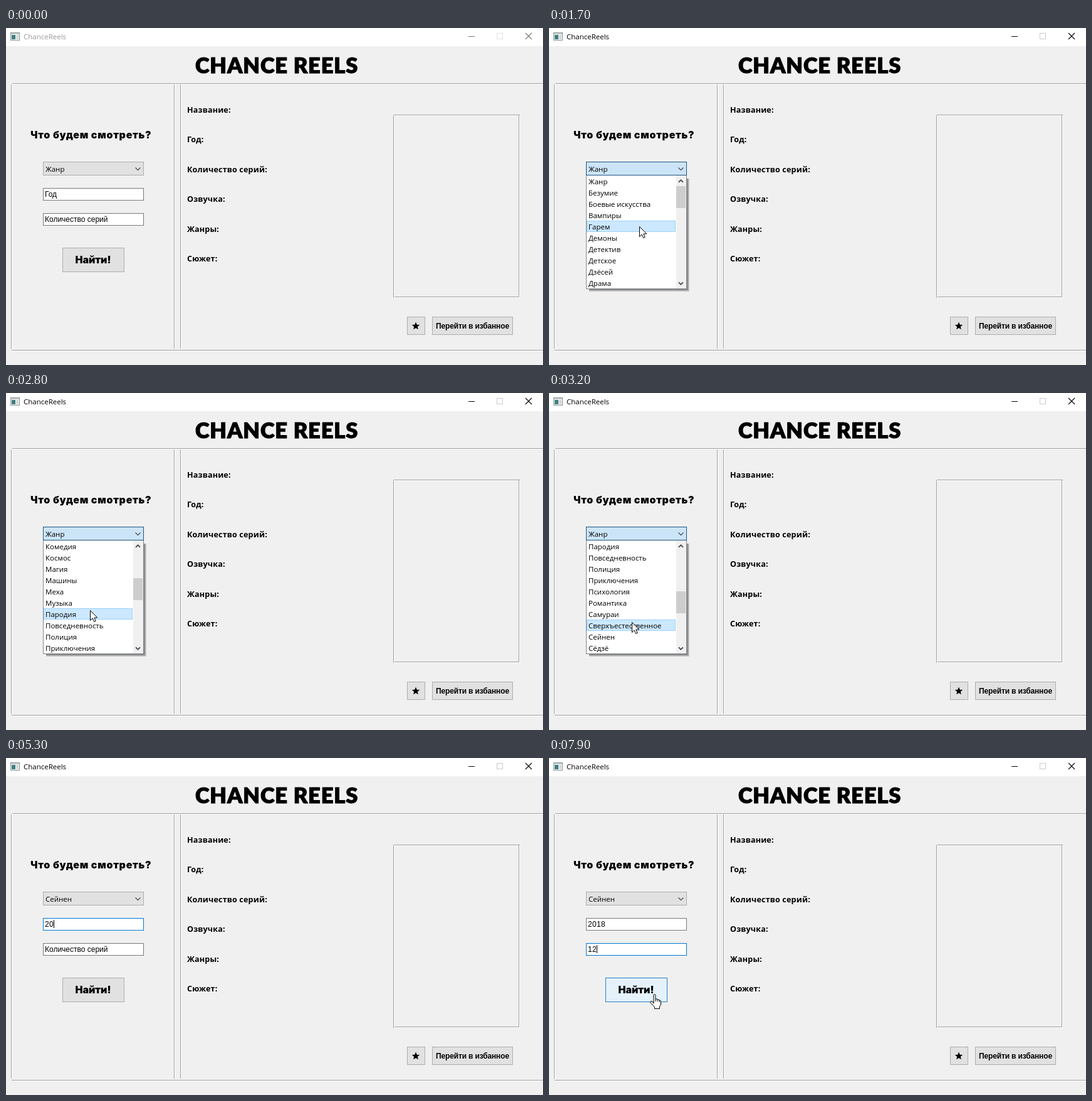
Write an HTML page with a canvas that moves like this. It is 857 by 537 pixels and loops after 8000 ms.

```html
<!DOCTYPE html>
<html lang="ru">
<head>
<meta charset="utf-8">
<title>ChanceReels</title>
<style>
html, body { margin: 0; width: 100%; height: 100%; overflow: hidden; background: #f0f0f0; }
canvas { display: block; }
</style>
</head>
<body>
<canvas id="stage" width="857" height="537"></canvas>
<script>
const ctx = document.getElementById('stage').getContext('2d');
const LOOP = 8000, STEP = 100;

const UI = '11.5px "Open Sans", "Noto Sans", sans-serif';
const LABEL = '700 12.6px "Open Sans", "Noto Sans", sans-serif';
const BLACK = '900 16px Inter, "Liberation Sans", sans-serif';
const FIELD = '12px "Liberation Sans", sans-serif';
const TITLE = '900 34.5px Lato, "Open Sans", sans-serif';

const GENRES = ('Жанр,Безумие,Боевые искусства,Вампиры,Гарем,Демоны,Детектив,Детское,Дзёсей,Драма,' +
  'Игры,Исторический,Комедия,Космос,Магия,Машины,Меха,Музыка,Пародия,Повседневность,' +
  'Полиция,Приключения,Психология,Романтика,Самураи,Сверхъестественное,Сейнен,Сёдзё').split(',');

// Looks of the controls: [fill, border]
const LOOK = {
  idle: ['#e1e1e1', '#adadad'],
  fading: ['#dbe1e8', '#7a9ab5'],
  warm: ['#e1e5e9', '#6f9cc0'],
  hover: ['#e5f1fb', '#2a7fc4'],
  open: ['#cce4f7', '#1f5482']
};

// Pointer path: [time, x, y, shape]; each shape lasts until the next key
const PATH = [
  [200, 165, 51, 'arrow'], [500, 178, 150, 'arrow'], [700, 178, 222, 'arrow'],
  [900, 171, 218, 'arrow'], [1300, 171, 218, 'arrow'], [1400, 168, 240, 'arrow'],
  [1700, 144, 316, 'arrow'], [1900, 135, 352, 'arrow'], [2100, 135, 360, 'arrow'],
  [2600, 135, 360, 'arrow'], [2800, 134, 346, 'arrow'], [3100, 134, 346, 'arrow'],
  [3300, 130, 384, 'arrow'], [3500, 125, 380, 'arrow'], [3700, 109, 301, 'beam'],
  [3800, 105, 257, 'none'], [6200, 120, 326, 'arrow'], [6300, 135, 365, 'hand'],
  [6400, 150, 407, 'arrow'], [6500, 170, 362, 'hand'], [6600, 184, 322, 'arrow'],
  [6700, 170, 300, 'none'], [7600, 186, 334, 'arrow'], [7800, 166, 367, 'hand'],
  [7900, 161, 376, 'hand']
];

// Value of the last entry whose time has passed
const at = (t, list) => list.reduce((v, [from, value]) => (t >= from ? value : v), list[0][1]);

function rect(x, y, w, h, fill) {
  ctx.fillStyle = fill;
  ctx.fillRect(x, y, w, h);
}

function box(x, y, w, h, [fill, border]) {
  rect(x, y, w, h, border);
  rect(x + 1, y + 1, w - 2, h - 2, fill);
}

function text(str, x, y, font, spacing = 0, color = '#000', align = 'left') {
  ctx.font = font;
  ctx.letterSpacing = spacing + 'px';
  ctx.textAlign = align;
  ctx.fillStyle = color;
  ctx.fillText(str, x, y);
}

function line(points, color, width = 1) {
  ctx.beginPath();
  points.forEach(([x, y]) => ctx.lineTo(x, y));
  ctx.strokeStyle = color;
  ctx.lineWidth = width;
  ctx.stroke();
}

function chevron(x, y, dir, color, width, size = 4) {
  line([[x - size, y - dir * size / 2], [x, y + dir * size / 2], [x + size, y - dir * size / 2]], color, width);
}

function etchH(x, y, w) {
  rect(x, y, w, 1, '#a0a0a0');
  rect(x, y + 1, w, 1, '#fff');
}

function etchV(x, y, h) {
  rect(x, y, 1, h, '#a0a0a0');
  rect(x + 1, y, 1, h, '#fff');
}

function titleBar(active) {
  rect(0, 0, 857, 29, '#fff');
  box(7, 7, 15, 13, ['#f4f6f6', '#8b9495']);
  rect(8, 8, 13, 2, '#c3cbcc');
  rect(9, 11, 6, 7, '#3f7f80');
  rect(16, 11, 4, 7, '#d5dadb');
  const ink = active ? '#000' : '#777';
  text('ChanceReels', 28, 18, UI, 0, active ? '#000' : '#999');
  rect(738, 13, 10, 1, ink);
  box(783, 8, 10, 10, ['#fff', active ? '#cccccc' : '#e2e2e2']);
  line([[829, 8], [839, 18]], ink, 1.1);
  line([[839, 8], [829, 18]], ink, 1.1);
}

function star(cx, cy, r) {
  ctx.beginPath();
  for (let i = 0; i < 10; i++) {
    const a = i * Math.PI / 5 - Math.PI / 2, d = i % 2 ? r * 0.45 : r;
    ctx.lineTo(cx + d * Math.cos(a), cy + d * Math.sin(a));
  }
  ctx.fillStyle = '#000';
  ctx.fill();
}

function heading() {
  text('CHANCE REELS', 432, 72, TITLE, 0.8, '#000', 'center');
  ctx.strokeStyle = '#000';
  ctx.lineWidth = 1;
  ctx.lineJoin = 'round';
  ctx.strokeText('CHANCE REELS', 432, 72);
  ctx.lineJoin = 'miter';
}

function panels() {
  etchH(10, 88, 847);
  etchH(9, 513, 848);
  etchV(8, 90, 421);
  etchV(268, 90, 421);
  etchV(278, 90, 421);
  etchH(619, 138, 201);
  etchH(619, 428, 201);
  etchV(618, 139, 291);
  etchV(818, 139, 290);

  heading();
  text('Что будем смотреть?', 39, 176, BLACK, 0.7);
  ['Название:', 'Год:', 'Количество серий:', 'Озвучка:', 'Жанры:', 'Сюжет:']
    .forEach((s, i) => text(s, 289, 135 + Math.round(i * 47.4), LABEL, 0.15));

  box(640, 460, 29, 29, LOOK.idle);
  star(654, 475, 6.5);
  box(680, 460, 129, 29, LOOK.idle);
  text('Перейти в избанное', 686, 479, 'bold ' + FIELD, -0.15);
}

function combo(label, look) {
  box(59, 213, 161, 22, look);
  text(label, 63, 229, UI);
  chevron(210.5, 224.5, 1, '#444', 1.1);
}

function field(y, value, focused, caret) {
  box(59, y, 161, 20, ['#fff', focused ? '#0078d7' : '#7a7a7a']);
  text(value, 62, y + 14, FIELD, /^\d/.test(value) ? 0.33 : 0);
  if (caret) rect(62 + 7 * value.length, y + 3, 1, 13, '#000');
}

function button(look) {
  box(90, 350, 99, 39, look);
  text('Найти!', 139, 375, BLACK, 0, '#000', 'center');
}

function popup(scroll, row, slide) {
  const h = 181 - slide;
  if (!slide) {
    for (let i = 4; i > 0; i--) rect(64, 240, 156 + i, 176 + i, 'rgba(0,0,0,.14)');
  }
  ctx.save();
  ctx.beginPath();
  ctx.rect(59, 235, 161, h);
  ctx.clip();
  ctx.translate(0, -slide);
  box(59, 234, 161, 182, ['#fff', '#828790']);
  if (slide) rect(60, 235, 142, 18, '#dadada');
  else box(60, 235 + row * 18, 142, 18, ['#cce8ff', '#99d1ff']);
  for (let i = 0; i < 10; i++) text(GENRES[scroll + i] || '', 63, 249 + i * 18, UI);
  rect(203, 235, 16, 180, '#f0f0f0');
  rect(203, 252 + Math.round(scroll * 3.58), 15, 35, '#cdcdcd');
  chevron(210.5, 244, -1, '#505050', 1.8, 3.5);
  chevron(210.5, 407, 1, '#505050', 1.8, 3.5);
  ctx.restore();
}

const SHAPES = {
  arrow: 'M.5 .5V16.5L4.2 13 6.6 18.5 9.2 17.4 6.8 12H11.8Z',
  hand: 'M6 15V2Q6 .5 7.5 .5T9 2V8Q11.5 7 12 9Q14.5 8 15 10Q17.5 9.5 17.5 12V17L15.5 20V23.5H7.5V21L1 14Q0 12 2 11.5T6 15Z'
};

function pointer(shape, x, y) {
  if (shape === 'beam') {
    rect(x, y + 1, 1, 15, '#fff');
    rect(x - 3, y, 7, 1, '#fff');
    rect(x - 3, y + 15, 7, 1, '#fff');
  } else if (SHAPES[shape]) {
    ctx.save();
    ctx.translate(x, y);
    const p = new Path2D(SHAPES[shape]);
    ctx.fillStyle = '#fff';
    ctx.fill(p);
    ctx.strokeStyle = '#000';
    ctx.lineWidth = 1;
    ctx.stroke(p);
    if (shape === 'hand') {
      line([[9, 8], [9, 12]], '#000');
      line([[12, 9], [12, 12]], '#000');
      line([[15, 10], [15, 13]], '#000');
    }
    ctx.restore();
  }
}

function pointerAt(t) {
  if (t < PATH[0][0]) return { shape: 'none', x: 0, y: 0 };
  const i = PATH.findLastIndex(k => t >= k[0]);
  const a = PATH[i], b = PATH[i + 1] || a;
  const k = a === b || a[3] === 'none' ? 0 : (t - a[0]) / (b[0] - a[0]);
  return {
    shape: a[3],
    x: Math.round(a[1] + (b[1] - a[1]) * k),
    y: Math.round(a[2] + (b[2] - a[2]) * k)
  };
}

function draw(t) {
  const p = pointerAt(t);
  const isOpen = t >= 1200 && t < 3500;

  rect(0, 0, 857, 537, '#f0f0f0');
  titleBar(t >= 1100);
  panels();

  combo(t < 3500 ? 'Жанр' : 'Сейнен', LOOK[at(t, [
    [0, 'idle'], [700, 'fading'], [800, 'hover'], [1400, 'open'], [3600, 'fading'], [3800, 'idle']])]);

  const year = at(t, [[0, 'Год'], [4200, ''], [5100, '210'], [5300, '20'], [5400, '201'], [5600, '2018']]);
  const yearCaret = at(t, [[0, 0], [4200, 1], [4400, 0], [4800, 1], [5100, 0], [5300, 1],
    [6200, 0], [6700, 1], [6900, 0]]);
  field(255, year, t >= 4000 && t < 6900, yearCaret);

  const count = at(t, [[0, 'Количество серий'], [7200, '1'], [7500, '12']]);
  field(295, count, t >= 6900, t >= 7200);

  button(LOOK[at(t, [[0, 'idle'], [6300, 'warm'], [6500, 'hover'], [6600, 'warm'],
    [6700, 'idle'], [7800, 'warm'], [7900, 'hover']])]);

  if (isOpen) {
    const scroll = at(t, [[0, 0], [2400, 6], [2500, 12], [3000, 15], [3100, 18]]);
    popup(scroll, Math.floor((p.y - 235) / 18), t < 1400 ? 13 : 0);
  }
  pointer(p.shape, p.x, p.y);
}

const start = performance.now();
function frame() {
  const t = (performance.now() - start) % LOOP;
  draw(Math.floor(t / STEP) * STEP);
  requestAnimationFrame(frame);
}
frame();
</script>
</body>
</html>
```
